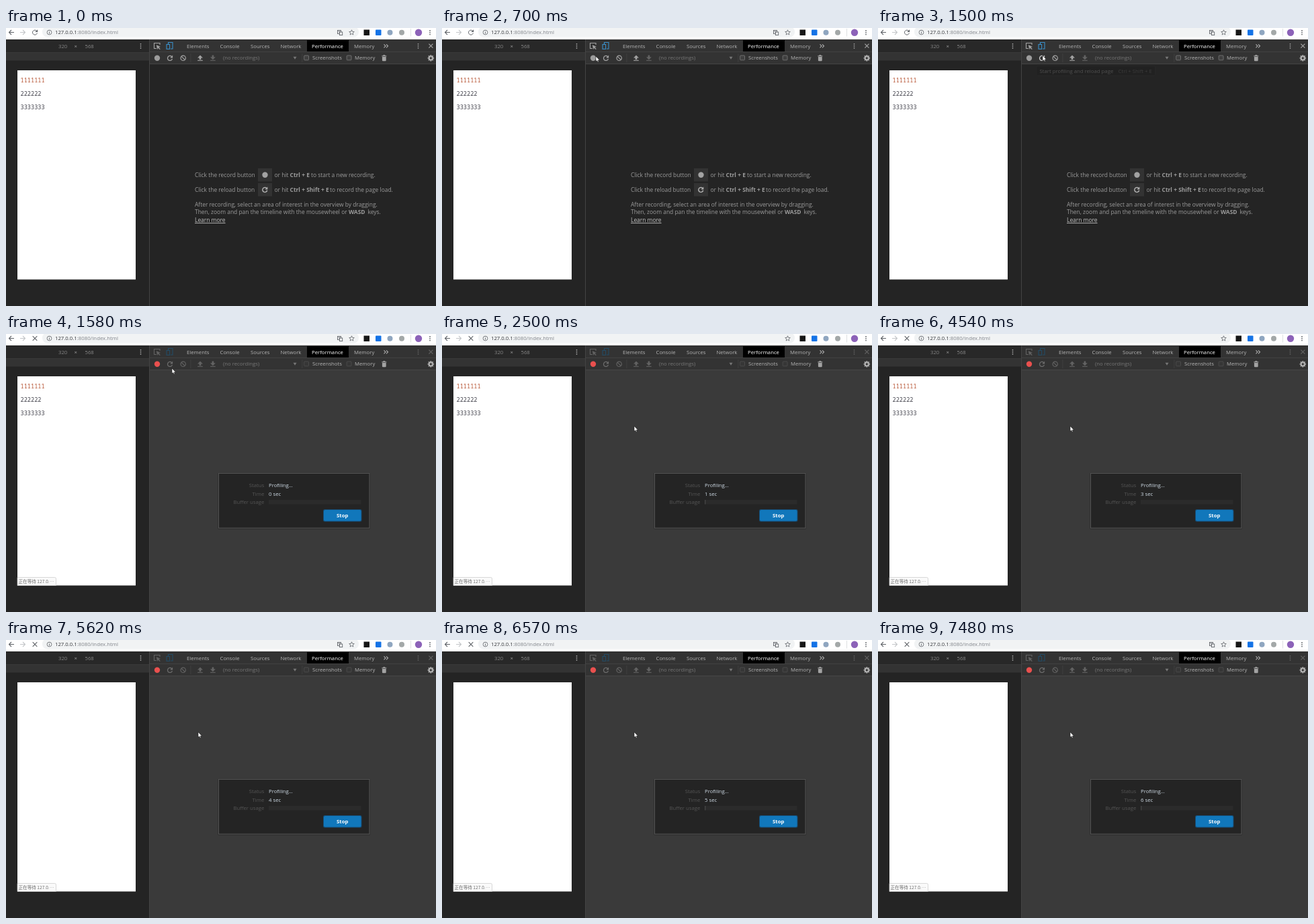
An HTML page for the animation above (8000 ms loop, 640x414 px).

```html
<!DOCTYPE html>
<html lang="en">
<head>
<meta charset="utf-8">
<title>Performance recording</title>
<style>
html, body { margin: 0; width: 100%; height: 100%; overflow: hidden; background: #242424; }
svg { display: block; width: 100vw; height: 100vh; }
text { font-family: "Open Sans", "Noto Sans", sans-serif; font-size: 7.75px; white-space: pre; }
.body { font-size: 8.45px; fill: #9b9b9b; }
.b { font-weight: 700; }
.mono { font-family: "Noto Sans Mono", "DejaVu Sans Mono", monospace; font-size: 8.6px; }
.cjk { font-family: "Noto Sans CJK SC", "Noto Sans CJK", sans-serif; font-size: 6.6px; }
</style>
</head>
<body>
<svg id="stage" viewBox="0 0 640 414" xmlns="http://www.w3.org/2000/svg"></svg>
<script>
const LOOP = 8000, LOAD = 1580;
const NS = "http://www.w3.org/2000/svg";
const stage = document.getElementById("stage");

function add(tag, attrs, parent = stage) {
  const el = document.createElementNS(NS, tag);
  for (const k in attrs) el.setAttribute(k, attrs[k]);
  parent.appendChild(el);
  return el;
}
const group = (parent = stage) => add("g", {}, parent);
const rect = (x, y, width, height, fill, parent, more) =>
  add("rect", { x, y, width, height, fill, ...more }, parent);
const dot = (cx, cy, r, fill, parent) => add("circle", { cx, cy, r, fill }, parent);
const line = (d, stroke, parent, w = 1, more) =>
  add("path", { d, stroke, fill: "none", "stroke-width": w, ...more }, parent);
const shape = (d, fill, parent, more) => add("path", { d, fill, ...more }, parent);
function text(str, x, y, fill, parent, more) {
  const el = add("text", { x, y, ...(fill && { fill }), ...more }, parent);
  el.textContent = str;
  return el;
}
const dots = (x, y, fill, gap = 3, parent) =>
  [-gap, 0, gap].forEach(d => dot(x, y + d, 0.9, fill, parent));
const reloadIcon = (x, y, color, parent, w = 1.3) => {
  const g = add("g", { transform: `translate(${x} ${y})` }, parent);
  line("M2.6 -2.2A3.5 3.5 0 1 0 3.4 1", color, g, w);
  shape("M4.1 -4.3V-.4H.2Z", color, g);
  return g;
};

// Browser toolbar
rect(0, 0, 640, 17, "#fff");
rect(54, -2, 471, 15.5, "#f1f3f4", stage, { rx: 7.5 });
line("M12 6.5H4.5M8 3L4.5 6.5L8 10", "#5f6368", stage, 1.1);
line("M21 6.5H28.5M25 3L28.5 6.5L25 10", "#c4c6c9", stage, 1.1);
const idleIcon = reloadIcon(43, 6.5, "#5f6368", stage, 1);
const stopIcon = line("M39.7 3.2L46.3 9.8M46.3 3.2L39.7 9.8", "#5f6368", stage, 1.1);
add("circle", { cx: 64.5, cy: 6.5, r: 3.4, fill: "none", stroke: "#5f6368", "stroke-width": 0.8 });
line("M64.5 6V8.5M64.5 4.4V5.2", "#5f6368", stage, 0.9);
const url = text("127.0.0.1", 73, 9.3, "#303236");
const tail = add("tspan", { fill: "#80848a" }, url);
tail.textContent = ":8080/index.html";

const translate = group();
rect(493.5, 3.5, 5, 5, "#f1f3f4", translate, { stroke: "#5f6368", "stroke-width": 0.9 });
rect(496.5, 6, 4.2, 4.6, "#f1f3f4", translate, { stroke: "#5f6368", "stroke-width": 0.9 });
line("M494.7 5.2H497.4M496 4.4V7", "#5f6368", translate, 0.6);

let star = "";
for (let i = 0; i < 10; i++) {
  const a = i * Math.PI / 5 - Math.PI / 2, r = i % 2 ? 1.8 : 4;
  star += (i ? "L" : "M") + (514.5 + r * Math.cos(a)).toFixed(2) + " " + (6.8 + r * Math.sin(a)).toFixed(2);
}
line(star + "Z", "#5f6368", stage, 0.8);
rect(532.5, 2.5, 8.5, 8.5, "#161616");
rect(550, 2.5, 8.5, 8.5, "#1473e6", stage, { rx: 1 });
dot(571.5, 6.8, 4, "#8fa6c0");
dot(589, 6.8, 4, "#a3a8a8");
line("M602.5 1V12.5", "#d5d7da", stage, 0.8);
dot(614, 6.8, 5.2, "#8c62b8");
dots(631, 6.8, "#5f6368", 2.8);

// Device pane
rect(0, 17, 213, 397, "#242424");
rect(0, 17, 213, 19, "#282828");
rect(0, 36.5, 213, 12, "#333");
rect(0, 36, 213, 0.8, "#3c3c3c");
text("320", 78, 29.8, "#858585");
text("×", 101.5, 30, "#a0a0a0", stage, { "font-size": 9 });
text("568", 117.5, 29.8, "#858585");
dots(200.5, 26.8, "#b0b0b0");
rect(17, 63, 176, 311.5, "#fff");
const page = group();
["1111111", "222222", "3333333"].forEach((s, i) =>
  text(s, 21.5, 81 + i * 20.2, i ? "#40404a" : "#b5512f", page, { class: "mono" }));
const waiting = group();
shape("M17 362.5H72.5Q74.5 362.5 74.5 364.5V374.5H17Z", "#fafafa", waiting, { stroke: "#c9c9c9", "stroke-width": 0.7 });
text("正在等待 127.0.…", 18.5, 370.8, "#6a6a6a", waiting, { class: "cjk" });

// Tools pane
const pane = rect(213, 53, 427, 361, "#242424");
rect(213, 17, 427, 36, "#333");
rect(213, 35, 427, 0.9, "#444");
rect(213, 53, 427, 0.9, "#484848");
rect(213, 17, 1, 397, "#444");

rect(448, 18, 62, 17, "#000");
[["Elements", 269], ["Console", 318.5], ["Sources", 364], ["Network", 408.5],
 ["Performance", 455], ["Memory", 518]].forEach(([s, x]) =>
  text(s, x, 29.6, s === "Performance" ? "#fff" : "#b4b4b4"));
line("M562.5 24.3L565 26.8L562.5 29.3M566 24.3L568.5 26.8L566 29.3", "#b0b0b0", stage, 1.1);

const idleTools = group(), busyTools = group();
function tools(g, gray, blue, record, strong) {
  line("M224 30.5H220.5V22.5H229V25", gray, g, 1.1);
  shape("M223.8 25.3L230 28L227.4 28.8L229.8 31.2L228.8 32L226.5 29.7L225.4 32Z", gray, g);
  line("M241.5 24V21.5H248V31H245", blue, g, 1.1);
  rect(239, 24.5, 4.6, 6.8, "none", g, { stroke: blue, "stroke-width": 1.1 });
  dots(613.5, 26.8, gray, 3, g);
  line("M629.4 23.7L635.4 29.7M635.4 23.7L629.4 29.7", gray, g, 1.2);
  dot(225, 44.8, 4.2, record, g);
  add("circle", { cx: 263.7, cy: 44.8, r: 3.7, fill: "none", stroke: gray, "stroke-width": 1.2 }, g);
  line("M261.2 42.3L266.2 47.3", gray, g, 1.2);
  shape("M289 40.5L293 44.6H290.3V47H287.7V44.6H285Z", gray, g);
  rect(285.2, 47.8, 7.6, 1.1, gray, g);
  [447, 510.5].forEach(x => rect(x - 3.3, 41, 6.8, 6.8, strong ? "#3f3f3f" : "#363636", g,
    { rx: 1, stroke: strong ? "#858585" : "#555", "stroke-width": 0.7 }));
}
tools(idleTools, "#a3a3a3", "#3a8fc9", "#9c9c9c", true);
tools(busyTools, "#626262", "#234c66", "#e9504e", false);
const reloadIdle = reloadIcon(244, 44.8, "#a3a3a3", idleTools);
const reloadHover = reloadIcon(244, 44.8, "#d0d0d0", idleTools);
reloadIcon(244, 44.8, "#6c6c6c", busyTools);
shape("M306.6 40.5H309.2V43.2H311.8L307.9 47.2L304 43.2H306.6Z", "#636363");
rect(304.1, 47.8, 7.6, 1.1, "#636363");
[274.5, 298.5, 318, 440.5].forEach((x, i) => i % 3 === 0 && rect(x, 38, 0.8, 13, "#424242"));
text("(no recordings)", 323, 47.4, "#777");
shape("M427.5 42.8H432.5L430 46.8Z", "#777");
text("Screenshots", 456, 47.4, "#b4b4b4");
text("Memory", 519, 47.4, "#b4b4b4");
rect(559.3, 41.2, 7, 1.2, "#a3a3a3");
rect(561.3, 40, 3, 1.2, "#a3a3a3");
shape("M559.9 43H565.7V48Q565.7 49.3 564.5 49.3H561.1Q559.9 49.3 559.9 48Z", "#a3a3a3");
add("circle", { cx: 632.3, cy: 44.8, r: 2.6, fill: "none", stroke: "#b0b0b0", "stroke-width": 2 });
for (let i = 0; i < 8; i++)
  rect(631.4, 40.1, 1.8, 2, "#b0b0b0", stage, { transform: `rotate(${i * 45} 632.3 44.8)` });

// Landing hints
const hints = group();
const hint = (s, x, y, cls = "") => text(s, x, y, "", hints, { class: "body " + cls });
[[219, "Click the record button"], [241, "Click the reload button"]].forEach(([y, s]) => {
  hint(s, 281, y + 3.3);
  rect(375, y - 10, 21, 19.5, "#333", hints);
  hint("or hit", 399.5, y + 3.3);
});
dot(385.5, 218.8, 4.2, "#a3a3a3", hints);
reloadIcon(385.3, 240.8, "#b0b0b0", hints, 1.5);
hint("Ctrl + E", 422.5, 222.3, "b");
hint("to start a new recording.", 454, 222.3);
hint("Ctrl + Shift + E", 422.5, 244.3, "b");
hint("to record the page load.", 482, 244.3);
hint("After recording, select an area of interest in the overview by dragging.", 281, 265.8);
hint("Then, zoom and pan the timeline with the mousewheel or", 281, 277.3);
hint("WASD", 510, 277.3, "b");
hint("keys.", 538.5, 277.3);
hint("Learn more", 281, 289.2).setAttribute("style", "fill:#c2c2c2;text-decoration:underline");

const tip = group();
rect(236, 56.5, 176.5, 14.5, "#212121", tip, { rx: 1.5, stroke: "#292929", "stroke-width": 0.8 });
text("Start profiling and reload page", 240.5, 66.6, "#505050", tip);
text("Ctrl + Shift + E", 357.5, 66.6, "#3c3c3c", tip);

// Recording dialog
const dialog = group();
rect(315, 206.5, 227.5, 84.5, "#000", dialog, { opacity: 0.18, rx: 2 });
rect(316.5, 207.5, 224.5, 81.5, "#242424", dialog, { stroke: "#555", "stroke-width": 1 });
[["Status", 228.2], ["Time", 240.6], ["Buffer usage", 252.9]].forEach(([s, y]) =>
  text(s, 384.3, y, "#555", dialog, { "text-anchor": "end" }));
text("Profiling…", 391, 228.2, "#cfdbe6", dialog);
const clock = text("", 391, 240.6, "#cfdbe6", dialog);
rect(391, 247, 137.5, 6.5, "#2b2b2b", dialog);
const usage = rect(391, 247, 1.4, 6.5, "#444", dialog);
rect(472, 261, 57.5, 18.5, "#174a70", dialog, { rx: 2.5 });
rect(473, 262, 55.5, 16.5, "#1177bb", dialog, { rx: 2 });
text("Stop", 500.7, 273.3, "#fff", dialog, { class: "b", "text-anchor": "middle" });

const cursor = shape("M0 0V8L1.8 6.4L3 9L4.3 8.4L3.2 5.9H5.6Z", "#fff", stage,
  { stroke: "#111", "stroke-width": 0.6 });

// [time, x, y]: the pointer rests at each place until the next time
const path = [
  [70, 567, 382], [150, 440, 220], [220, 292, 160], [300, 399, 122],
  [450, 340, 90], [530, 270, 60], [610, 220, 46], [690, 229, 42], [770, 239, 40],
  [920, 245, 41], [1170, 246, 42], [1240, 245, 41], [LOAD, 247, 51],
  [1670, 266, 88], [1740, 288, 129], [1890, 287, 132], [1960, 286, 135], [2040, 286, 137]
];
const ticks = [2500, 3530, 4540, 5620, 6570, 7480];
const show = (el, on) => el.setAttribute("visibility", on ? "visible" : "hidden");

function draw(t) {
  const busy = t >= LOAD;
  [dialog, busyTools, stopIcon, waiting].forEach(el => show(el, busy));
  [hints, idleTools, idleIcon].forEach(el => show(el, !busy));
  pane.setAttribute("fill", busy ? "#3a3a3a" : "#242424");
  const hover = t >= 920;
  show(reloadHover, !busy && hover);
  show(reloadIdle, !busy && !hover);
  show(tip, t >= 1500 && !busy);
  show(translate, t < 1670 || t >= 5450);
  show(page, t < 5620);
  show(usage, (t >= 2040 && t < 4540) || t >= 6570);
  clock.textContent = ticks.filter(k => t >= k).length + " sec";
  const at = path.filter(p => t >= p[0]).pop();
  show(cursor, !!at);
  if (at) cursor.setAttribute("transform", `translate(${at[1]} ${at[2]})`);
}
function frame() {
  draw(performance.now() % LOOP);
  requestAnimationFrame(frame);
}
frame();
</script>
</body>
</html>
```
